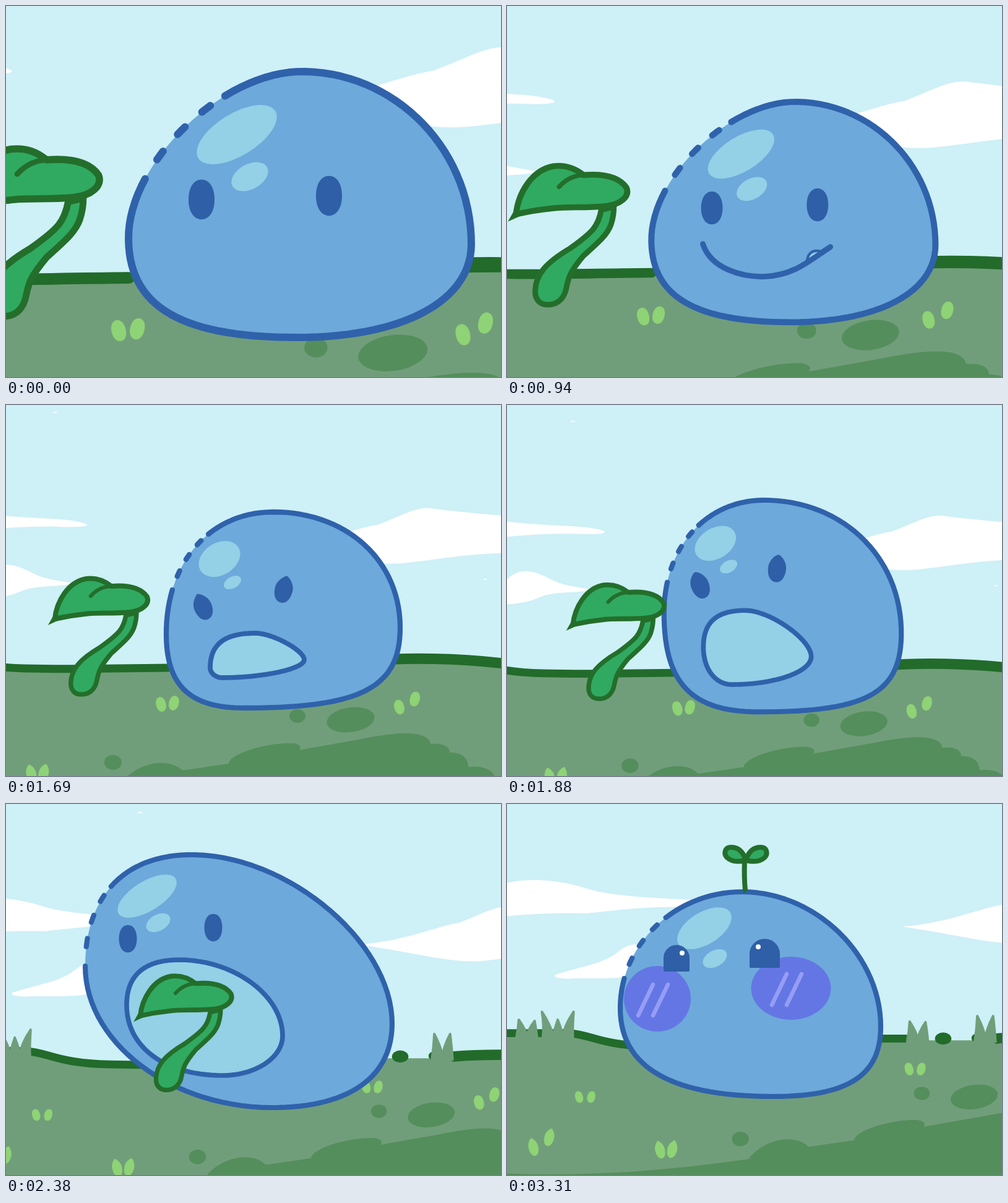
An HTML page with a canvas for the animation above (3.5 s loop, 800 by 600 pixels).

```html
<!DOCTYPE html>
<html lang="en">
<head>
<meta charset="utf-8">
<title>Slime and sprout</title>
<style>
html, body { margin: 0; width: 100%; height: 100%; overflow: hidden; background: #cef0f7; }
canvas { display: block; width: 800px; height: 600px; }
</style>
</head>
<body>
<canvas id="stage" width="800" height="600"></canvas>
<script>
const ctx = document.getElementById('stage').getContext('2d');
const LOOP = 3500, STEP = 62.5, LAST = 53;
const SKY = '#cef0f7', GROUND = '#719e7a', MOSS = '#548e5c', BAND = '#226b2a', BLADE = '#8ed375';
const LEAF = '#30aa61', STEM = '#246e2b';
const BODY = '#6da9da', LINE = '#2f62ab', EYE = '#2f5fa7', SHINE = '#94d0e6';

const clamp = v => Math.max(0, Math.min(1, v));
const smooth = v => v * v * (3 - 2 * v);
const ramp = (s, a, b) => smooth(clamp((s - a) / (b - a)));
const mix = (a, b, k) => a.map((v, i) => v + (b[i] - v) * k);

// The two keys around step s and how far s lies between them
function between(keys, s) {
  let i = 0;
  while (i < keys.length - 2 && s >= keys[i + 1][0]) i++;
  const [s0, a] = keys[i], [s1, b] = keys[i + 1];
  return [a, b, clamp((s - s0) / (s1 - s0))];
}

// ---- camera: zoom out about one point, then pan ----
const PAN = [[28, [6.9, 6.7]], [34, [72.2, 30.6]], [38, [139.2, 2]], [45, [207, -27]]];
function camera(s) {
  if (s > 28) return [0.984, ...mix(...between(PAN, s))];
  const z = 1.446 - 0.0165 * s;
  return [z, (1 - z) * 404, (1 - z) * 392];
}

// ---- drawing helpers ----
function paint(d, fill, line, width) {
  const path = new Path2D(d);
  if (fill) { ctx.fillStyle = fill; ctx.fill(path); }
  if (line) { ctx.strokeStyle = line; ctx.lineWidth = width; ctx.stroke(path); }
}
function oval(color, x, y, rx, ry = rx, rot = 0) {
  ctx.fillStyle = color;
  ctx.beginPath();
  ctx.ellipse(x, y, rx, ry, rot, 0, 2 * Math.PI);
  ctx.fill();
}
// Oval whose top gets sharper as k goes to 1
function drop(color, x, y, rx, ry, rot, k) {
  const t = rx * .6 * (1 - k), c = rx * .6, h = ry * .6;
  ctx.save();
  ctx.translate(x, y);
  ctx.rotate(rot);
  paint(`M0 ${-ry}C${t} ${-ry} ${rx} ${-h} ${rx} 0C${rx} ${h} ${c} ${ry} 0 ${ry}` +
    `C${-c} ${ry} ${-rx} ${h} ${-rx} 0C${-rx} ${-h} ${-t} ${-ry} 0 ${-ry}Z`, color);
  ctx.restore();
}
// Draw scaled about a fixed point
function scaled(x, y, k, kx, art) {
  ctx.save();
  ctx.translate(x, y);
  ctx.scale(k * kx, k);
  ctx.translate(-x, -y);
  art();
  ctx.restore();
}

// A blob is given by its top, right, bottom and left points and the roundness
// of the four quarters; u runs clockwise from the top, one unit per quarter.
function rim(ends, round, u) {
  const q = Math.floor(u + 4) % 4, t = u - Math.floor(u), n = (q + 1) % 4;
  const w = v => 3 * (1 - v) ** 2 * v * round[q] + 3 * (1 - v) * v * v + v ** 3;
  const pace = [w(t), 1 - w(1 - t)];
  return [0, 1].map(i => {
    const a = ends[2 * q + i], b = ends[2 * n + i];
    return a + (b - a) * pace[(q + i) % 2];
  });
}
function arc(ends, round, from, to) {
  const n = Math.ceil((to - from) * 30);
  ctx.beginPath();
  for (let i = 0; i <= n; i++) ctx.lineTo(...rim(ends, round, from + (to - from) * i / n));
}
function fillBlob(color, ends, round) {
  arc(ends, round, 0, 4);
  ctx.fillStyle = color;
  ctx.fill();
}
function strokeBlob(width, ends, round, from = 0, to = 4) {
  arc(ends, round, from, to);
  ctx.strokeStyle = LINE;
  ctx.lineWidth = width;
  ctx.stroke();
}

// ---- scenery ----
const clouds = [
  'M438 229C520 222 560 200 603 193C645 177 660 166 685 167C725 172 760 176 820 180V239' +
    'C740 240 700 250 640 256C590 260 540 244 438 229Z',
  'M-240 166C-190 146 -130 150 -78 167C-30 182 60 182 100 186C146 192 140 199 90 197' +
    'C20 195 -30 202 -78 207C-140 206 -190 208 -240 216Z',
  'M-131 308C-80 292 -50 290 -25 268C-5 252 15 258 40 270C65 284 85 283 110 289' +
    'C70 296 50 290 20 303C-10 316 -60 314 -100 314C-125 316 -135 312 -131 308Z'
];
const ridge = 'M-300 404H-110C-70 406 -60 424 30 426S150 426 262 425';
const hill = 'M-300 630C-100 645 50 630 186 611C215 575 265 570 285 591L360 580' +
  'C360 565 420 545 465 547Q480 550 474 558L570 541Q680 518 686 548Q716 546 717 562' +
  'Q746 562 747 585Q780 582 790 600V900H-300Z';

// Grass on the horizon: blades fan out from x
function weed(x, y, ...heights) {
  heights.forEach((h, i) => {
    const d = i - (heights.length - 1) / 2, foot = x + d * 16;
    paint(`M${foot - 9} ${y}Q${foot - 6} ${y - h * .5} ${x + d * 26} ${y - h}` +
      `Q${foot + 8} ${y - h * .4} ${foot + 9} ${y}Z`, GROUND, GROUND, 4);
  });
}
// Two small light leaves, the right one raised
function leaves(x, y, rise, r, sharp = 0) {
  for (const side of [-1, 1]) {
    drop(BLADE, x + side * (10 + rise * .2), y - side * rise / 2, r, r * (1.5 + .4 * sharp), side * .25, sharp);
  }
}

function scenery() {
  clouds.forEach(d => paint(d, '#fff'));
  oval('#fff', 79, 12, 4, 1);
  oval('#fff', 774, 282, 3, 1);

  paint(ridge + 'L400 416H590C640 408 730 408 820 420V900H-300Z', GROUND);
  paint(ridge + 'M380 413H445M559 412H566', null, BAND, 13);
  paint('M594 413C640 409 730 408 820 420', null, BAND, 17);
  oval(BAND, 506, 413, 13.5, 10);
  weed(464, 418, 33, 32);
  weed(575, 418, 42, 42);
  weed(-178, 412, 30, 28);
  weed(-127, 415, 46, 33, 46);

  paint(hill, MOSS);
  oval(MOSS, 471, 503, 13, 11);
  oval(MOSS, 557, 509, 39, 20, -.14);
  oval(MOSS, 173, 578, 14, 12);
  leaves(261, 483, 2, 8);
  leaves(648, 482, 13, 8);
  leaves(-82, 509, 0, 6.5);
  leaves(460, 463, 0, 7);
  leaves(51, 595, 1, 8, .9);
  leaves(-154, 583, 16, 8, .9);
}

function plant() {
  paint('M194 340C190 362 183 370 152 392C118 412 106 428 105 448C104 462 112 468 122 468' +
    'C138 468 145 456 147 445C150 432 150 426 170 402C190 384 202 374 207 360Q211 348 211 336Z',
    LEAF, STEM, 7.5);
  paint('M68 356L76 342L92 345Z', STEM);
  paint('M79 346C82 318 100 286 130 281C148 279 160 285 170 293C195 291 217 294 228 310' +
    'C233 322 220 333 200 335C170 338 150 335 128 338C108 340 92 343 79 346Z', LEAF, STEM, 8);
  paint('M137 309C146 299 158 293 172 293', null, STEM, 6);
}

// ---- slime poses, in stage coordinates at the step `seen` ----
// body, mouth: blob ends; gap: dashed part of the last quarter;
// eye: size, lean, anger; size: both radii of the big shine, one of the small
const rest = {
  seen: 0, body: [478,106, 752,385, 470,536, 198,375], round: [.55, .61, .69, .455], gap: [.255, .68],
  eyes: [316,313, 522,307], eye: [21, 0, 0], shine: [373,208, 394,276], size: [73, 34, 32],
  mouth: [423,430, 520,432, 423,436, 330,432], lips: [.5, .5, .5, .5]
};
const angry = {
  seen: 27, body: [432,173, 637,360, 385,490, 259,370], round: [.58, .75, .7, .59], gap: [.22, .6],
  eyes: [318,326, 449,298], eye: [14.5, 0, .8], shine: [345,249, 366,287], size: [36, 26, 15],
  mouth: [403,369, 482,412, 350,441, 330,425], lips: [.35, .5, .55, .68]
};
const rear = {
  seen: 34, body: [350,81, 629,385, 450,511, 212,230], round: [.55, .8, .75, .56], gap: [0, .44],
  eyes: [270,181, 383,156], eye: [15.5, -.27, 0], shine: [291,137, 314,175], size: [38, 22, 16],
  mouth: [315,218, 503,385, 380,478, 258,290], lips: [.43, .68, .68, .7]
};
const gulp = {
  seen: 38, body: [300,82, 624,355, 430,491, 128,262], round: [.48, .64, .54, .63], gap: [0, .48],
  eyes: [197,218, 335,200], eye: [14.5, 0, 0], shine: [228,149, 246,192], size: [54, 24, 21],
  mouth: [280,252, 447,375, 350,439, 195,325], lips: [.53, .55, .6, .66]
};
const happy = {
  seen: 45, body: [380,142, 604,360, 430,473, 183,330], round: [.53, .7, .67, .55], gap: [.16, .57],
  eyes: [274,249, 416,242], eye: [15, 0, 0], shine: [319,201, 336,250], size: [49, 26, 21],
  mouth: [342,303, 370,305, 342,307, 314,305], lips: [.5, .5, .5, .5]
};

function toWorld(pose) {
  const [z, ...shift] = camera(pose.seen), out = { ...pose };
  for (const key of ['body', 'eyes', 'shine', 'mouth']) {
    out[key] = pose[key].map((v, i) => (v - shift[i % 2]) / z);
  }
  out.eye = [pose.eye[0] / z, ...pose.eye.slice(1)];
  out.size = pose.size.map(v => v / z);
  return out;
}
const poses = [[0, rest], [22, rest], [26, angry], [28, angry], [34, rear], [38, gulp], [45, happy]]
  .map(([s, pose]) => [s, toWorld(pose)]);

function poseAt(s) {
  const [a, b, k] = between(poses, s), out = {};
  for (const key in a) if (key !== 'seen') out[key] = mix(a[key], b[key], smooth(k));
  return out;
}

function eyes({ eyes: [lx, ly, rx, ry], eye: [r, lean, anger] }) {
  drop(EYE, lx, ly, r, r * 1.53, lean - .5 * anger, anger);
  drop(EYE, rx, ry, r, r * 1.53, lean + .3 * anger, anger);
}

function smile(s) {
  const lick = ramp(s, 4, 8) * (1 - ramp(s, 13, 17));
  if (lick) scaled(482, 404, lick, 1, () =>
    paint('M461 417C461 397 474 379 503 390Q480 409 461 417', SHINE, LINE, 7));
  ctx.setLineDash([42 * s, 400]);
  paint('M331 386C342 420 385 431 415 430C455 428 475 408 503 390', null, LINE, 7.5);
  ctx.setLineDash([]);
}

function slime(s, pose) {
  const { body, round, gap: [a, b], shine, size, mouth, lips } = pose;
  fillBlob(BODY, body, round);
  strokeBlob(8.3, body, round, b - 1, a + 3);
  for (let i = 0; i < 3; i++) {
    const u = 3 + a + (b - a) * (.2 + .28 * i);
    strokeBlob(8.3, body, round, u, u + (b - a) * .09);
  }
  oval(SHINE, shine[0], shine[1], size[0], size[1], -.55);
  oval(SHINE, shine[2], shine[3], size[2], size[2] * .63, -.5);
  if (s > 0 && s < 23) smile(s);
  else if (s > 22 && s < 45) {
    fillBlob(SHINE, mouth, lips);
    strokeBlob(7.8, mouth, lips);
  }
}

// ---- happy ending, in stage coordinates ----
function blush(x, y, rx, ry) {
  oval('#6476e4', x, y, rx, ry);
  for (const d of [-7, 17]) paint(`M${x + d} ${y - 23}l-24 50`, null, '#969df5', 6.5);
}
function domeEye(x, y, w, h, glint) {
  const r = w / 2;
  paint(`M${x + 2} ${y + h - 2}V${y + r}a${r - 2} ${r - 2} 0 0 1 ${w - 4} 0V${y + h - 2}Z`, EYE, EYE, 4);
  oval('#fff', x + glint, y + 13, 4);
}
function ending(s) {
  ctx.globalAlpha = clamp((s - 45) / 4);
  blush(243, 315, 54, 53);
  blush(459, 298, 64.5, 51);
  ctx.globalAlpha = 1;
  if (s >= 48) {
    domeEye(253, 228, 42, 43, 30);
    domeEye(392, 218, 49, 47, 14);
  }
  scaled(385, 142, ramp(s, 45, 51), 1, () => {
    paint('M384 92Q383 118 385 139', null, STEM, 8);
    for (const side of [1, -1]) scaled(386, 91, 1, side, () =>
      paint('M386 91C382 78 374 70 362 70C352 70 350 80 355 86C362 93 374 94 386 91Z', LEAF, STEM, 8));
  });
}

function view(z, x, y) { ctx.setTransform(z, 0, 0, z, x, y); }

function draw(s) {
  const pose = poseAt(s), cam = camera(s);
  view(1, 0, 0);
  ctx.fillStyle = SKY;
  ctx.fillRect(0, 0, 800, 600);
  ctx.lineCap = ctx.lineJoin = 'round';
  view(...cam);
  scenery();
  slime(s, pose);
  if (s < 48) eyes(pose);
  if (s < 45) {
    ctx.save();
    if (s > 38) {
      arc(pose.mouth, pose.lips, 0, 4);
      ctx.clip();
    }
    plant();
    ctx.restore();
  }
  view(1, 0, 0);
  if (s > 45) ending(s);
}

const start = performance.now();
function tick() {
  const t = (performance.now() - start) % LOOP;
  // Steps start on whole hundredths of a second
  draw(Math.min(LAST, Math.floor((Math.floor(t / 10) * 10 + 4.9) / STEP)));
  requestAnimationFrame(tick);
}
tick();
</script>
</body>
</html>
```
